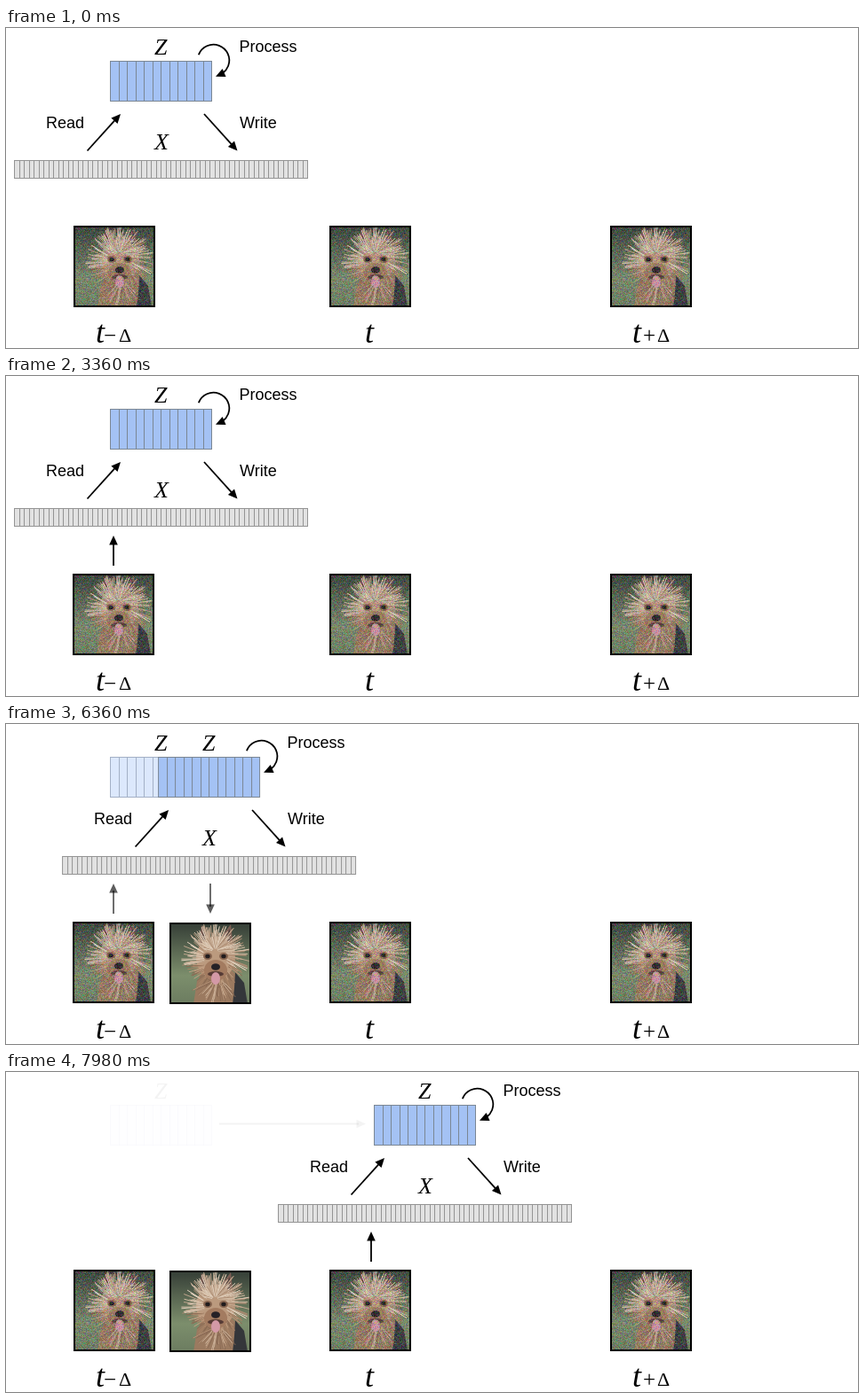
These frames come from a looping animation (959x361 px, 8 s). An HTML page with a canvas:

```html
<!DOCTYPE html>
<html lang="en">
<head>
<meta charset="utf-8">
<title>Read, process, write</title>
<style>
html, body { margin: 0; width: 100%; height: 100%; overflow: hidden; background: #fff; }
canvas { display: block; width: 959px; height: 361px; }
</style>
</head>
<body>
<canvas id="stage"></canvas>
<script>
const W = 959, H = 361, LOOP = 8000, SHIFT = 297, SIZE = 92;
const SANS = '18px "Liberation Sans", Arial, sans-serif';
const SERIF = '"Liberation Serif", "Times New Roman", serif';
const SPINS = [1890, 2250, 2610, 3870, 4230, 4590];
const READS = [1530, 3510], WRITES = [3150, 5130];

const canvas = document.getElementById('stage');
const dpr = window.devicePixelRatio || 1;
canvas.width = Math.round(W * dpr);
canvas.height = Math.round(H * dpr);
const ctx = canvas.getContext('2d');

const clamp = v => Math.min(1, Math.max(0, v));
const span = (t, start, length) => clamp((t - start) / length);
const easeOut = p => 1 - (1 - p) * (1 - p);
const smooth = p => p * p * (3 - 2 * p);
const fadeIn = (t, start) => easeOut(span(t, start, 390));
const fadeOut = (t, start, length) => 1 - span(t, start, length);

function random(seed) {
  return () => {
    seed = (seed * 1664525 + 1013904223) >>> 0;
    return seed / 4294967296;
  };
}

// ---- picture of a shaggy dog ----

function ellipse(g, x, y, rx, ry, color) {
  g.fillStyle = color;
  g.beginPath();
  g.ellipse(x, y, rx, ry, 0, 0, 7);
  g.fill();
}

function polygon(g, color, ...p) {
  g.fillStyle = color;
  g.beginPath();
  for (let i = 0; i < p.length; i += 2) g.lineTo(p[i], p[i + 1]);
  g.fill();
}

// Strands of fur fanning out from a point between two angles.
function fur(g, rnd, count, x, y, from, to, near, far, colors) {
  g.lineWidth = 1;
  for (let i = 0; i < count; i++) {
    const a = from + (to - from) * rnd();
    const r0 = near * (0.6 + 0.5 * rnd()), r1 = far * (0.65 + 0.35 * rnd());
    g.strokeStyle = colors[Math.floor(rnd() * colors.length)];
    g.beginPath();
    g.moveTo(x + r0 * Math.cos(a), y + r0 * Math.sin(a));
    g.lineTo(x + r1 * Math.cos(a + 0.1), y + r1 * Math.sin(a + 0.1));
    g.stroke();
  }
}

function makePhoto(noise) {
  const c = document.createElement('canvas');
  c.width = c.height = SIZE;
  const g = c.getContext('2d'), rnd = random(11);

  const back = g.createLinearGradient(0, 0, 0, SIZE);
  back.addColorStop(0, '#343d36');
  back.addColorStop(0.3, '#56634f');
  back.addColorStop(0.65, '#7c8e6c');
  back.addColorStop(1, '#6c7c60');
  g.fillStyle = back;
  g.fillRect(0, 0, SIZE, SIZE);

  polygon(g, '#9b7a60', 27, 92, 31, 66, 40, 52, 66, 50, 79, 62, 86, 92);
  polygon(g, '#34363a', 74, 56, 84, 68, 88, 92, 71, 92, 73, 74);
  polygon(g, '#7d5f55', 33, 28, 36, 3, 48, 19);
  polygon(g, '#7d5f55', 56, 19, 69, 2, 72, 28);
  polygon(g, '#4e3d3b', 37, 20, 38, 8, 44, 19);
  polygon(g, '#4e3d3b', 61, 19, 68, 7, 68, 21);
  ellipse(g, 52, 40, 22, 24, '#bb9a7e');
  const pale = ['#d5bea6', '#c2a78f', '#e0cfbc', '#ab8b72'];
  fur(g, rnd, 120, 52, 38, -3.6, 0.5, 19, 39, pale);
  fur(g, rnd, 70, 52, 44, 0.2, 2.9, 18, 34, ['#a98467', '#c4a184', '#8b6b54']);
  fur(g, rnd, 70, 52, 32, -3.1, 0, 4, 22, pale);
  fur(g, rnd, 45, 53, 62, 0.5, 2.6, 12, 31, ['#b69478', '#8c6c56', '#c9ae95']);
  ellipse(g, 52, 54, 13, 12, '#a37b60');
  ellipse(g, 43, 38, 5, 4, '#86644f');
  ellipse(g, 61, 38, 5, 4, '#86644f');
  ellipse(g, 43, 38, 2.7, 2.3, '#211c1d');
  ellipse(g, 61, 38, 2.7, 2.3, '#211c1d');
  ellipse(g, 52, 50, 5, 3.8, '#252126');
  ellipse(g, 52, 58, 9, 3, '#563b35');
  ellipse(g, 52, 63, 5, 7, '#d399a6');

  if (noise) {
    const image = g.getImageData(0, 0, SIZE, SIZE), d = image.data;
    for (let i = 0; i < d.length; i++) {
      if (i % 4 < 3) d[i] = 112 + (d[i] - 112) * 0.83 + (rnd() + rnd() - 1) * noise;
    }
    g.putImageData(image, 0, 0);
  }
  g.lineWidth = 2;
  g.strokeStyle = '#000';
  g.strokeRect(1, 1, SIZE - 2, SIZE - 2);
  return c;
}

const noisy = makePhoto(46), clean = makePhoto(0);

// ---- diagram parts ----

function withAlpha(alpha, draw) {
  if (alpha <= 0) return;
  ctx.save();
  ctx.globalAlpha *= alpha;
  draw();
  ctx.restore();
}

function text(str, x, y, font) {
  ctx.font = font;
  ctx.fillStyle = '#000';
  ctx.fillText(str, x, y);
}

const symbol = (str, x, y, size) => text(str, x, y, `italic ${size}px ${SERIF}`);

function head(x, y, angle) {
  ctx.save();
  ctx.translate(x, y);
  ctx.rotate(angle);
  polygon(ctx, '#000', 0, 0, -10.5, -4.8, -10.5, 4.8);
  ctx.restore();
}

function arrow(x0, y0, x1, y1) {
  const a = Math.atan2(y1 - y0, x1 - x0);
  ctx.strokeStyle = '#000';
  ctx.lineWidth = 1.8;
  ctx.beginPath();
  ctx.moveTo(x0, y0);
  ctx.lineTo(x1 - 8 * Math.cos(a), y1 - 8 * Math.sin(a));
  ctx.stroke();
  head(x1, y1, a);
}

function cells(x, y, w, h, count, fill, line) {
  ctx.fillStyle = fill;
  ctx.fillRect(x, y, w, h);
  ctx.strokeStyle = line;
  ctx.lineWidth = 1;
  ctx.strokeRect(x, y, w, h);
  ctx.beginPath();
  for (let i = 1; i < count; i++) {
    const cx = Math.round(x + i * w / count - 0.5) + 0.5;
    ctx.moveTo(cx, y);
    ctx.lineTo(cx, y + h);
  }
  ctx.stroke();
}

function latents(fill, line) {
  cells(117.5, 37.5, 114, 45, 12, fill, line);
  symbol('Z', 167, 30, 26);
}

function loopArrow(turn) {
  ctx.save();
  ctx.translate(235, 39);
  ctx.rotate(turn * 2 * Math.PI);
  ctx.translate(-235, -39);
  ctx.strokeStyle = '#000';
  ctx.lineWidth = 1.8;
  ctx.beginPath();
  ctx.arc(233.5, 36.5, 17.8, Math.PI + 0.36, 2 * Math.PI + 0.95);
  ctx.stroke();
  head(236, 54.8, 2.72);
  ctx.restore();
}

function spin(t) {
  const start = SPINS.find(s => t > s && t < s + 210);
  return start ? (t - start) / 210 : 0;
}

function blink(t, starts) {
  const start = starts.find(s => t > s && t < s + 200);
  return start ? 1 - 0.7 * Math.sin(Math.PI * (t - start) / 200) ** 2 : 1;
}

function diagram(t) {
  latents('#a4c2f4', '#7b8794');
  cells(9.5, 149.5, 330, 20, 60, '#e2e2e2', '#949494');
  symbol('X', 167, 137, 26);
  text('Process', 262.5, 26.5, SANS);
  text('Read', 45, 113, SANS);
  text('Write', 263, 112.5, SANS);
  loopArrow(spin(t));
  withAlpha(blink(t, READS), () => arrow(91.5, 138.5, 129, 97));
  withAlpha(blink(t, WRITES), () => arrow(223, 97, 260.5, 138.5));
}

function labels() {
  const delta = `22px ${SERIF}`, sign = `25px ${SERIF}`;
  symbol('t', 101, 355, 36);
  text('−', 110, 355, sign);
  text('Δ', 127, 354, delta);
  symbol('t', 404, 355, 36);
  symbol('t', 705, 355, 36);
  text('+', 717, 355, sign);
  text('Δ', 733, 354, delta);
}

function render(t) {
  ctx.setTransform(dpr, 0, 0, dpr, 0, 0);
  ctx.fillStyle = '#fff';
  ctx.fillRect(0, 0, W, H);

  // The first photo rests one pixel to the left while it is being read.
  const nudge = span(t, 1110, 270) * fadeOut(t, 6690, 360);
  if (nudge < 1) ctx.drawImage(noisy, 76, 223);
  withAlpha(nudge, () => ctx.drawImage(noisy, 75, 223));
  ctx.drawImage(noisy, 364, 223);
  ctx.drawImage(noisy, 680, 223);
  labels();

  // Latents arriving from the previous step.
  withAlpha(fadeIn(t, 210) * fadeOut(t, 1110, 285), () => arrow(7, 58.5, 108, 58.5));
  const carry = fadeOut(t, 7635, 363);
  withAlpha(fadeIn(t, 6700) * carry, () => arrow(240, 58.5, 405, 58.5));
  withAlpha(fadeIn(t, 5690) * carry, () => latents('#dce8fc', '#a3b0c6'));

  const leave = fadeOut(t, 6240, 330);
  withAlpha(fadeIn(t, 210) * leave, () => arrow(121, 214, 121, 180));
  withAlpha(fadeIn(t, 5690) * leave, () => arrow(230, 180, 230, 214));
  withAlpha(fadeIn(t, 5690), () => ctx.drawImage(clean, 184, 224));
  withAlpha(fadeIn(t, 6715), () => arrow(411, 214, 411, 180));

  ctx.save();
  ctx.translate(SHIFT * smooth(span(t, 6245, 426)), 0);
  diagram(t);
  ctx.restore();
}

const begin = performance.now();
function tick() {
  render((performance.now() - begin) % LOOP);
  requestAnimationFrame(tick);
}
tick();
</script>
</body>
</html>
```
